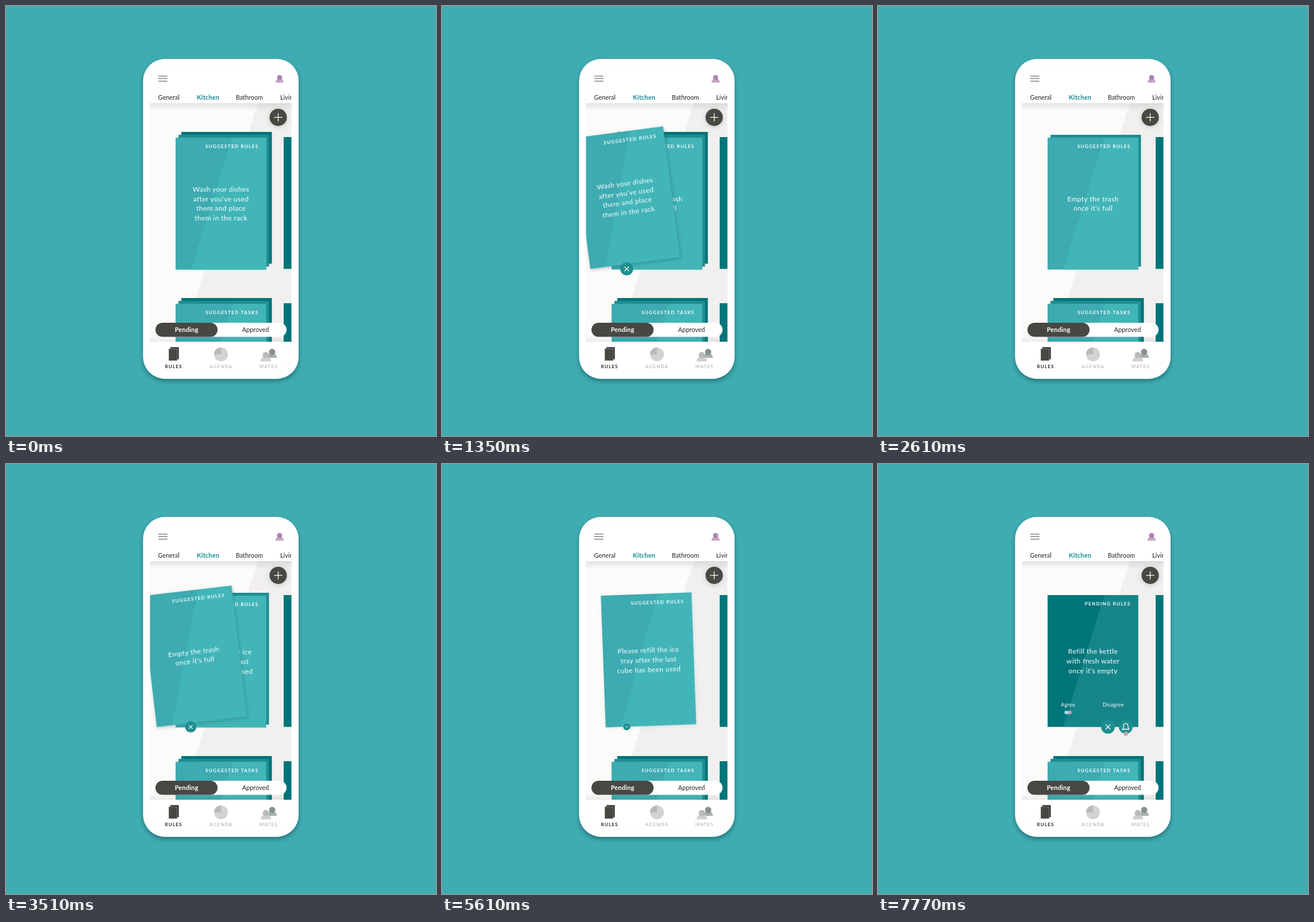
Write an HTML page that moves like this. It is 748 px wide and 748 px high and loops after 7.8 s.

```html
<!DOCTYPE html>
<html lang="en">
<head>
<meta charset="utf-8">
<title>House rules</title>
<style>
html, body { margin: 0; height: 100%; overflow: hidden; background: #3eacb1; }
svg { display: block; width: 100vw; height: 100vh; }
text { font: 12px Lato, "Open Sans", sans-serif; fill: #fff; }
.mid { text-anchor: middle; }
.body { letter-spacing: .4px; text-anchor: middle; }
.title { font-size: 8px; font-weight: 700; letter-spacing: 1.35px; text-anchor: end; }
.vote { font-size: 9px; letter-spacing: .3px; text-anchor: middle; }
.tab { font-size: 10.9px; fill: #222; }
.on { font-weight: 700; letter-spacing: .2px; }
.nav { font-size: 8px; letter-spacing: 1.2px; text-anchor: middle; fill: #acacaa; }
.line { fill: none; stroke: #fff; stroke-width: 1.3; stroke-linecap: round; }
</style>
</head>
<body>
<svg id="stage" viewBox="0 0 748 748"></svg>
<script>
const W = 157.5, H = 229.3, LEFT = 295, TOP = 229;
const LOOP = 7800, FIRST = 1050, GAP = 2200, DRAG = 400, HOLD = 500, FLY = 540;
const rules = [
  ["Wash your dishes", "after you’ve used", "them and place", "them in the rack"],
  ["Empty the trash", "once it’s full"],
  ["Please refill the ice", "tray after the last", "cube has been used"]
];

const rect = (x, y, w, h, fill, more = "") =>
  `<rect x="${x}" y="${y}" width="${w}" height="${h}" fill="${fill}" ${more}/>`;
const circle = (x, y, r, fill, more = "") =>
  `<circle cx="${x}" cy="${y}" r="${r}" fill="${fill}" ${more}/>`;
const path = (d, fill, more = "") => `<path d="${d}" fill="${fill}" ${more}/>`;
const text = (x, y, cls, str, more = "") =>
  `<text x="${x}" y="${y}" class="${cls}" ${more}>${str}</text>`;
const line = d => `<path d="${d}" class="line"/>`;
const group = (id, inner, more = "") => `<g id="${id}" ${more}>${inner}</g>`;

const sheet = (y, dark, light) => rect(LEFT, y, W, H, dark) +
  path(`M394 ${y}H${LEFT + W}V${y + H}H322Z`, light);
const teal = (y, title) => sheet(y, "#3dabb1", "#42b5b9") +
  text(439.5, y + 18.3, "title", title);
const body = (lines, y) => lines.map((str, i) =>
  text(374, y + 4 + (i - (lines.length - 1) / 2) * 16.7, "body", str)).join("");
const layer = (o, y, fill) => rect(LEFT + o, y - o, W, H, fill);
const cross = (x, y) => circle(x, y, 12, "#1f8e90") +
  line(`M${x - 3.7} ${y - 3.7}l7.4 7.4m0 -7.4l-7.4 7.4`);
const person = (x, y, r, w, head, torso) =>
  path(`M${x - w} ${y}a${w} ${w} 0 0 1 ${2 * w} 0z`, torso) +
  circle(x, y - w - r * .35, r, head);

const pending = sheet(228, "#00757a", "#16858a") +
  text(439.5, 246.3, "title", "PENDING RULES") +
  body(["Refill the kettle", "with fresh water", "once it’s empty"], 343) +
  text(330.5, 421.5, "vote", "Agree") + text(409.3, 421.5, "vote", "Disagree") +
  circle(327.6, 432.3, 3.3, "#8fe0e4") + circle(333.4, 432.3, 3.5, "#b79db3") +
  path("M330.5 430a3.4 3.4 0 0 1 0 4.6a3.4 3.4 0 0 1 0 -4.6", "#d5e4e8") +
  cross(400, 457.3) + circle(431, 457.3, 12, "#1f8e90") +
  line("M425.5 461.5h11c-1.6 -1.4 -1.6 -2.5 -1.6 -5c0 -3.2 -1.5 -5.2 -3.9 -5.2s-3.9 2 -3.9 5.2c0 2.5 0 3.6 -1.6 5z") +
  circle(431, 469.2, 3.7, "#c3a6a3");

const content =
  rect(250, 169, 247, 415, "#fcfbf9") + path("M438 169H497V584H306Z", "#f1f0ef") +
  layer(10, 518, "#00757a") + layer(5, 518, "#1f8e90") + teal(518, "SUGGESTED TASKS") +
  rect(483, 517, W, H, "#00757a") +
  group("next", rect(LEFT, 228, W, H, "#00757a")) + group("pending", pending) +
  [10, 5].map(o => group("layer" + o, rect(LEFT, TOP, W, H, "#1f8e90"))).join("") +
  [2, 1, 0].map(i => group("card" + i, teal(TOP, "SUGGESTED RULES") + body(rules[i], 344))).join("") +
  group("cross", cross(0, 0)) +
  rect(250, 169, 247, 14, "url(#down)") + rect(250, 573, 247, 11, "url(#up)") +
  circle(473.5, 193.7, 15, "#484843", 'filter="url(#soft)"') +
  line("M467 193.7h13m-6.5 -6.5v13");

const fade = (id, a, b) => `<linearGradient id="${id}" x2="0" y2="1">
  <stop stop-color="#555" stop-opacity="${a}"/><stop offset="1" stop-color="#555" stop-opacity="${b}"/></linearGradient>`;
const shadow = (id, dy, blur, alpha) => `<filter id="${id}" x="-30%" y="-30%" width="160%" height="160%">
  <feDropShadow dx="0" dy="${dy}" stdDeviation="${blur}" flood-color="#123" flood-opacity="${alpha}"/></filter>`;

stage.innerHTML = `<defs>${fade("down", .14, 0)}${fade("up", 0, .1)}
  ${shadow("deep", 4, 3.5, .42)}${shadow("soft", 1.5, 4, .2)}
  <clipPath id="view">${rect(250.5, 169, 246, 415, "#000")}</clipPath>
  <clipPath id="wide">${rect(250.5, 140, 246, 30, "#000")}</clipPath></defs>` +
  rect(238.5, 92, 270.5, 556.5, "#fff", 'rx="38" filter="url(#deep)"') +
  rect(250.5, 104.5, 246, 532, "#fff", 'rx="27" stroke="#f7f7f7" stroke-width=".8"') +
  path("M265 122h15.7m-15.7 4.3h15.7m-15.7 4.4h15.7", "none", 'stroke="#484843" stroke-width="1.1"') +
  person(476, 133.3, 4.5, 7.2, "#ab86ad", "#c9a3c3") +
  group("tabs", text(264.5, 162.6, "tab", "General") +
    text(332, 162.6, "tab on", "Kitchen", 'style="fill:#138d8f"') +
    text(399.7, 162.6, "tab", "Bathroom") + text(477, 162.6, "tab", "Living"), 'clip-path="url(#wide)"') +
  group("content", content, 'clip-path="url(#view)"') +
  rect(260, 551, 228, 24.5, "#fff", 'rx="12.2"') + rect(260, 551, 108, 24.5, "#484843", 'rx="12.2"') +
  text(314, 567.2, "tab on mid", "Pending", 'style="fill:#fff"') +
  text(434, 567.2, "tab mid", "Approved") +
  rect(286, 593.5, 14.5, 21, "#222") +
  rect(283, 596, 15, 21, "#484843", 'stroke="#fff" stroke-width=".4"') +
  circle(374, 606, 12, "#d2d2d0") + path("M374 606h-12a12 12 0 0 1 12 -12z", "#b9b9b7") +
  person(463, 612, 5.5, 8.3, "#85918d", "#a9aeab") + person(452, 618.3, 5.5, 9.2, "#bababa", "#d0d0ce") +
  text(291.6, 630.3, "nav", "RULES", 'style="fill:#222;font-weight:700"') +
  text(374, 630.3, "nav", "AGENDA") + text(456.8, 630.3, "nav", "MATES");

const el = id => document.getElementById(id);
const clamp = v => Math.min(1, Math.max(0, v));
const ease = p => p < .5 ? 4 * p ** 3 : 1 - 4 * (1 - p) ** 3;
const place = (id, value) => el(id).setAttribute("transform", value);
const mix = (a, b, p) => `rgb(${a.map((v, i) => v + (b[i] - v) * p)})`;

function draw(t) {
  const swipes = rules.map((_, i) => {
    const s = t - FIRST - GAP * i;
    return { drag: clamp(s / DRAG), fly: clamp((s - HOLD) / FLY) };
  });

  swipes.forEach(({ drag, fly }, i) => {
    const d = ease(drag), f = fly ** 1.5, card = el("card" + i);
    place("card" + i, `translate(${-56 * d - 237 * f} ${-11 * d - 63 * f}) rotate(${-8 * d - 13.6 * f} 374 343.6)`);
    card.style.filter = d > 0 ? `drop-shadow(1px 2px 3px rgba(0,50,55,${.3 * d}))` : "none";
    card.style.display = fly < 1 ? "" : "none";
  });

  // the sheets behind step forward as each card leaves
  const gone = ease(swipes[0].fly) + ease(swipes[1].fly);
  for (const start of [10, 5]) {
    const o = Math.max(0, start - 5 * gone), node = el("layer" + start);
    place("layer" + start, `translate(${o} ${-o})`);
    node.style.display = o > .01 ? "" : "none";
    node.firstChild.setAttribute("fill", mix([31, 142, 144], [0, 117, 122], clamp(o / 5 - 1)));
  }

  const now = swipes.find(s => s.drag > 0 && s.fly < 1);
  el("cross").style.display = now ? "" : "none";
  if (now) {
    const size = Math.min(1, 1.25 * now.drag) * (1 + 1.1 * now.fly);
    place("cross", `translate(321.3 457.3) scale(${size})`);
    el("cross").style.opacity = 1 - now.fly;
  }

  const rest = 188 * (1 - ease(swipes[2].fly));
  place("pending", `translate(${rest} 0)`);
  place("next", `translate(${188 + 2 * rest} 0)`);
}

const begin = performance.now();
function tick() {
  draw((performance.now() - begin) % LOOP);
  requestAnimationFrame(tick);
}
tick();
</script>
</body>
</html>
```
